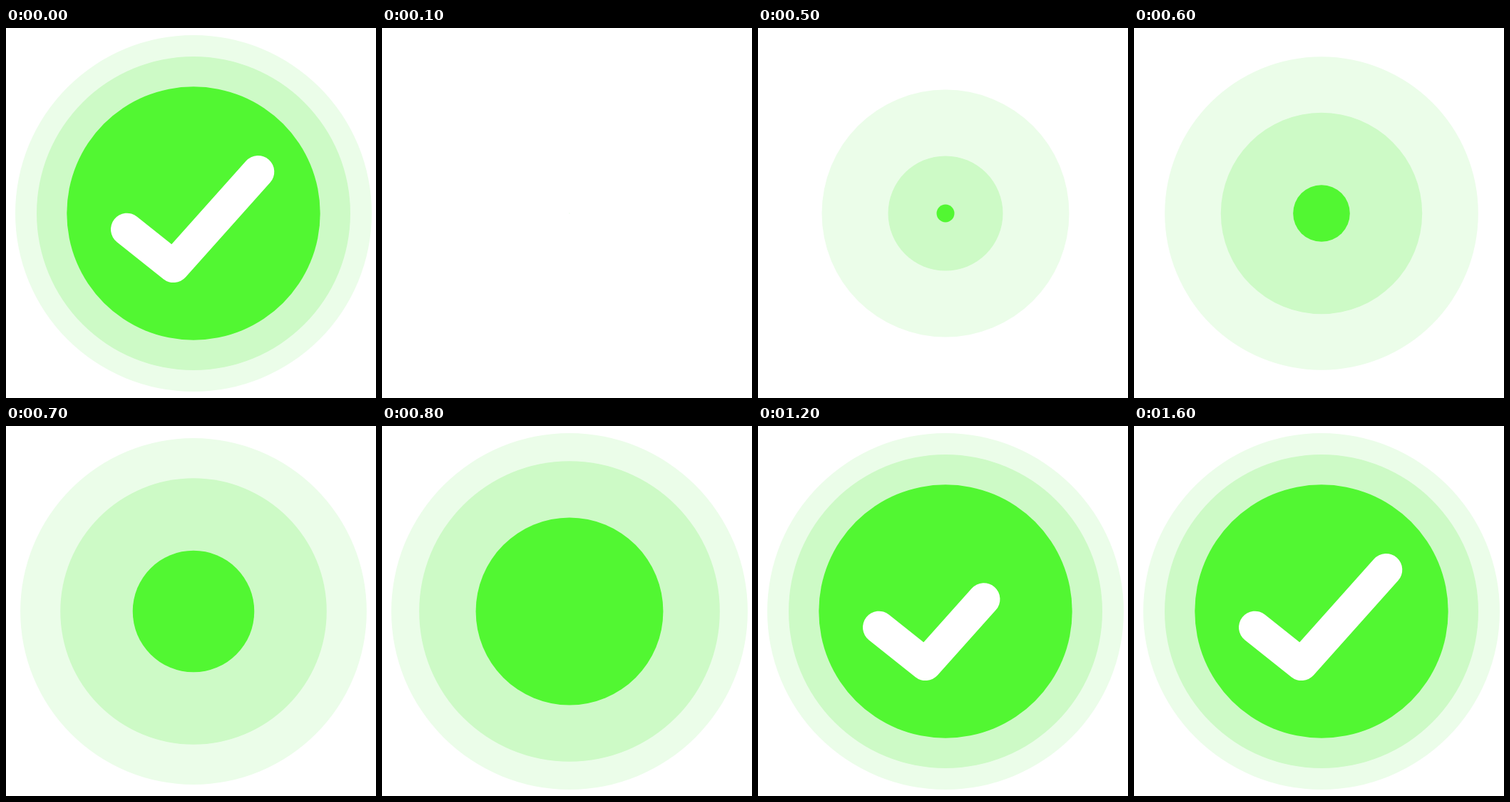
An HTML page with a canvas that plays this animation: 519 by 519 pixels, repeating every 2300 ms.

```html
<!DOCTYPE html>
<html lang="en">
<head>
<meta charset="utf-8">
<title>Success check</title>
<style>
  html, body { margin: 0; width: 100%; height: 100%; overflow: hidden; background: #fff; }
  canvas { display: block; }
</style>
</head>
<body>
<canvas id="stage" width="519" height="519"></canvas>
<script>
const ctx = document.getElementById('stage').getContext('2d');
const LOOP = 2300, STEP = 100;
const CENTER = { x: 263, y: 260 };

function bezier(x1, y1, x2, y2) {
  const at = (a, b, s) => 3 * a * s * (1 - s) ** 2 + 3 * b * s * s * (1 - s) + s ** 3;
  return x => {
    if (x <= 0) return 0;
    if (x >= 1) return 1;
    let lo = 0, hi = 1;
    for (let i = 0; i < 30; i++) {
      const mid = (lo + hi) / 2;
      if (at(x1, x2, mid) < x) lo = mid; else hi = mid;
    }
    return at(y1, y2, lo);
  };
}

const grow = bezier(0.506, 0, 0.455, 1);
const draw = bezier(0.25, 0.1, 0.25, 1);

const discs = [
  { color: '#ebfde9', radius: 250, start: 66 },
  { color: '#cdfac6', radius: 220, start: 187 },
  { color: '#52f732', radius: 177.7, start: 346 }
];
const GROW_TIME = 744;

const check = { start: 840, time: 740, width: 45.4, points: [[169.7, 282.4], [235, 334.4], [353.6, 201.7]] };

function drawDisc({ color, radius, start }, t) {
  ctx.fillStyle = color;
  ctx.beginPath();
  ctx.arc(CENTER.x, CENTER.y, radius * grow((t - start) / GROW_TIME), 0, Math.PI * 2);
  ctx.fill();
}

function drawCheck(t) {
  const progress = draw((t - check.start) / check.time);
  if (progress <= 0) return;
  const [a, b, c] = check.points;
  const length = (p, q) => Math.hypot(q[0] - p[0], q[1] - p[1]);
  let left = progress * (length(a, b) + length(b, c));

  ctx.strokeStyle = '#fff';
  ctx.lineWidth = check.width;
  ctx.lineCap = ctx.lineJoin = 'round';
  ctx.beginPath();
  ctx.moveTo(...a);
  for (const [p, q] of [[a, b], [b, c]]) {
    const size = length(p, q);
    const k = Math.min(1, left / size);
    ctx.lineTo(p[0] + (q[0] - p[0]) * k, p[1] + (q[1] - p[1]) * k);
    left -= size;
    if (left <= 0) break;
  }
  ctx.stroke();
}

function render(time) {
  const t = Math.floor((time % LOOP) / STEP) * STEP;
  // The loop opens on the finished badge before it builds up again.
  const pose = t < STEP ? LOOP : t;
  ctx.fillStyle = '#fff';
  ctx.fillRect(0, 0, 519, 519);
  discs.forEach(disc => drawDisc(disc, pose));
  drawCheck(pose);
}

let origin;
function tick(now) {
  origin ??= now;
  render(now - origin);
  requestAnimationFrame(tick);
}
render(0);
requestAnimationFrame(tick);
</script>
</body>
</html>
```
